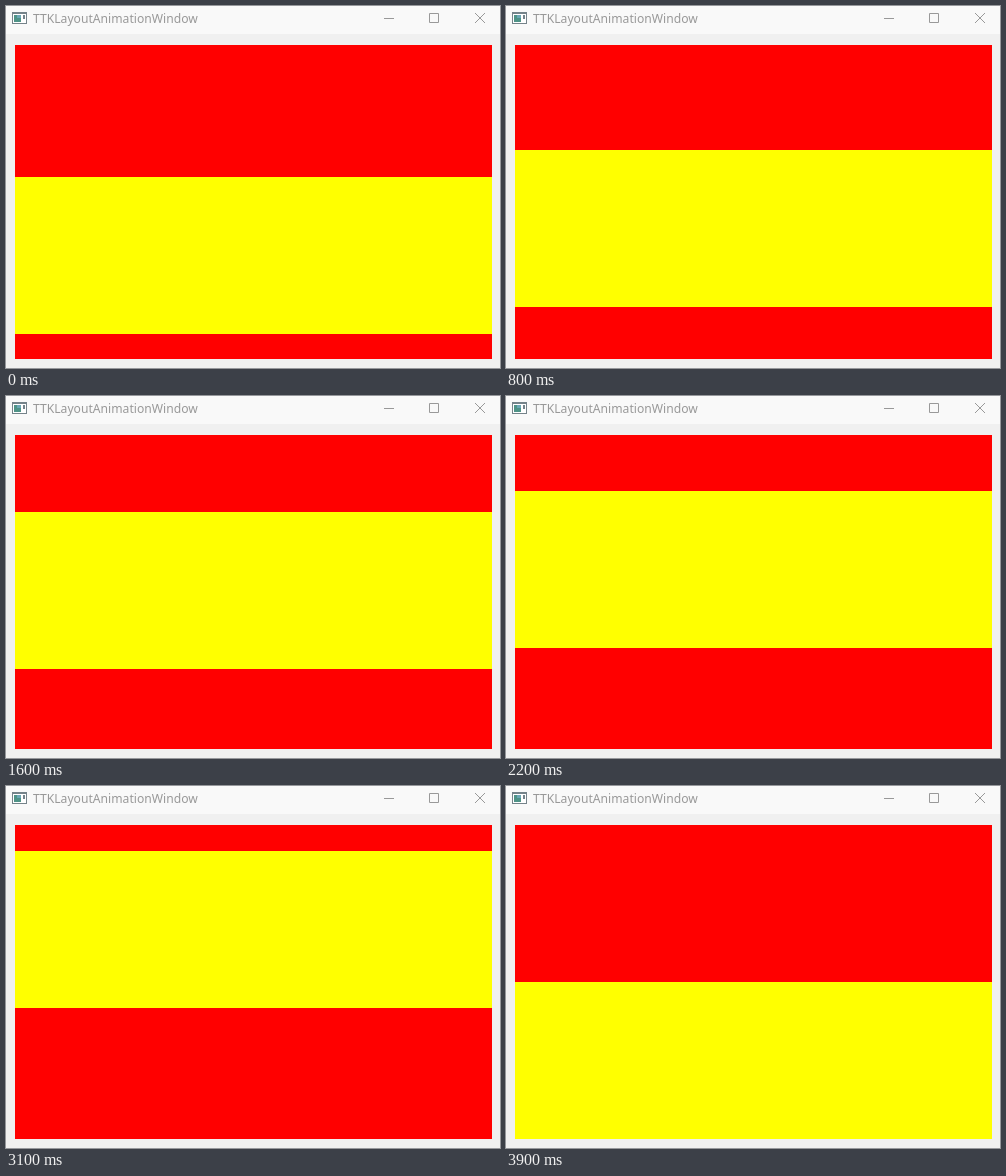
These frames come from a looping animation (494x362 px, 4.8 s). An HTML page:

```html
<!DOCTYPE html>
<html lang="en">
<head>
<meta charset="utf-8">
<title>TTKLayoutAnimationWindow</title>
<style>
  html, body { margin: 0; width: 100%; height: 100%; overflow: hidden; background: #f0f0f0; }
  svg { display: block; }
  text { font: 12.15px "Noto Sans", "Open Sans", sans-serif; fill: #999; }
</style>
</head>
<body>
<svg width="494" height="362" viewBox="0 0 494 362">
  <rect width="494" height="362" fill="#f0f0f0"/>
  <rect width="494" height="28" fill="#f9f9f9"/>

  <!-- window icon -->
  <g shape-rendering="crispEdges">
    <rect x="6" y="6" width="15" height="12" fill="#75838a"/>
    <rect x="7" y="8" width="13" height="9" fill="#fff"/>
    <rect x="8" y="9" width="7" height="7" fill="#4f9387"/>
    <rect x="11" y="9" width="4" height="3" fill="#6aa6b5"/>
    <rect x="17" y="9" width="2" height="4" fill="#75838a"/>
  </g>

  <text x="27" y="17">TTKLayoutAnimationWindow</text>

  <!-- window buttons -->
  <g fill="none" stroke="#999">
    <path d="M378 12.5h10M423.5 7.5h9v9h-9z"/>
    <path d="M469 7l10 10M479 7l-10 10"/>
  </g>

  <g shape-rendering="crispEdges">
    <rect x="9" y="39" width="477" height="314" fill="#f00"/>
    <rect id="panel" x="9" y="171" width="477" height="157" fill="#ff0"/>
  </g>
</svg>
<script>
  const LOOP = 4800, STEP = 100, SLIDE_END = 3900;
  const START = 171.17, SPEED = 3.44, TOP = 41, REST = 196;
  const panel = document.getElementById("panel");

  function panelY(t) {
    if (t >= SLIDE_END) return REST;
    const step = Math.floor(t / STEP);
    return Math.max(TOP, Math.round(START - SPEED * step));
  }

  let begin;
  function draw(now) {
    begin ??= now;
    panel.setAttribute("y", panelY((now - begin) % LOOP));
    requestAnimationFrame(draw);
  }
  requestAnimationFrame(draw);
</script>
</body>
</html>
```
